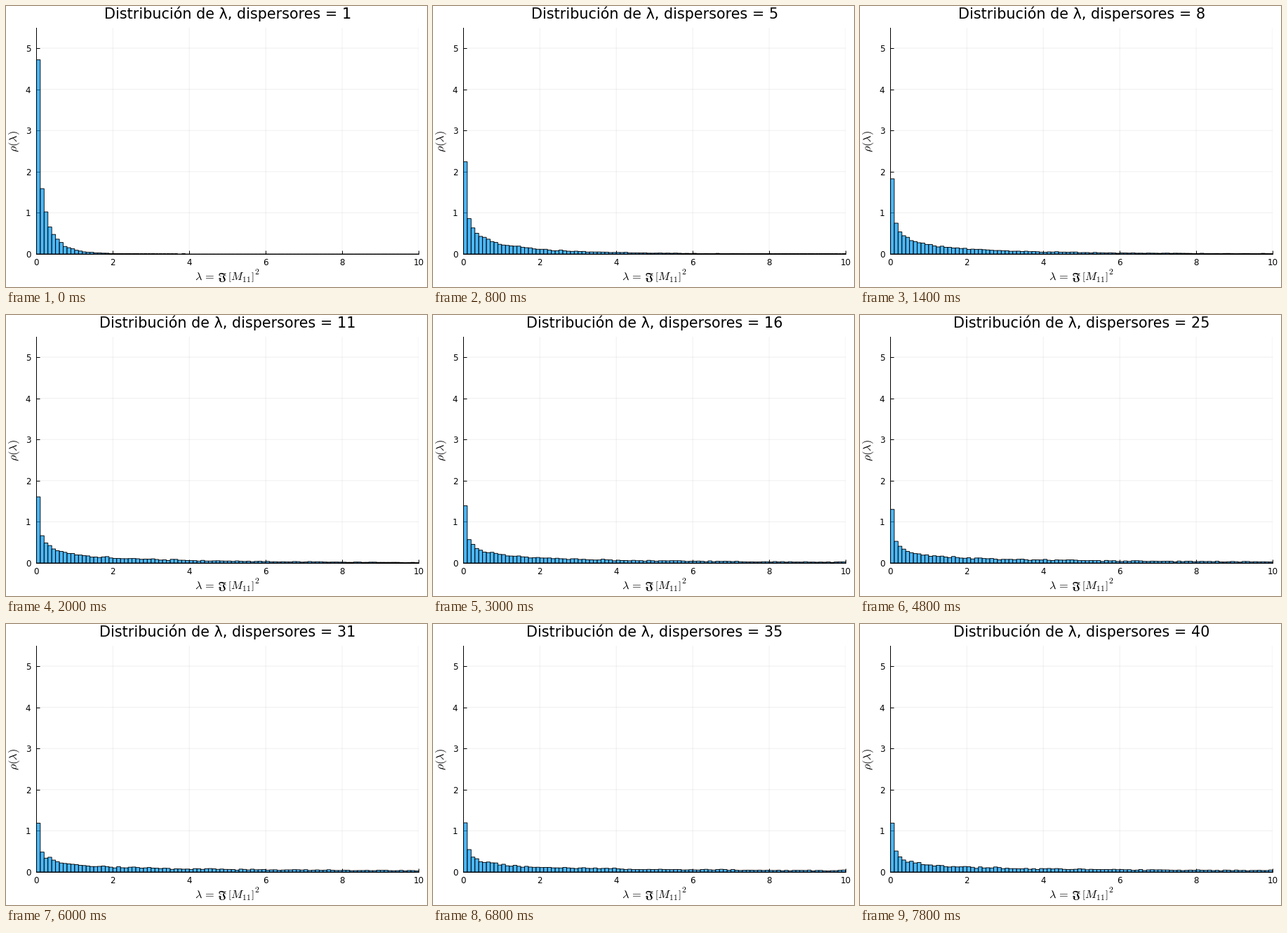
Recreate the animation shown at these times as a matplotlib script. Size 600 px wide and 400 px high, loop 8 s.

```python
import numpy as np
import matplotlib.pyplot as plt
from matplotlib.animation import FuncAnimation

W, H, DPI = 600, 400, 100
LEFT, RIGHT, TOP, BASE = 43.4, 588, 30.7, 353
FRAMES, STEP = 40, 200
SAMPLES = 16000
EDGES = np.linspace(0, 10, 101)

plt.rcParams["font.family"] = "DejaVu Sans"
plt.rcParams["mathtext.fontset"] = "cm"


def pt(px):
    return px * 72 / DPI


def density(n):
    """Histogram of a squared Gaussian whose variance is n / 4."""
    rng = np.random.default_rng(n)
    lam = rng.normal(0, np.sqrt(n) / 2, SAMPLES) ** 2
    return np.histogram(lam, EDGES, density=True)[0]


fig = plt.figure(figsize=(W / DPI, H / DPI), dpi=DPI, facecolor="white")
ax = fig.add_axes([LEFT / W, 1 - BASE / H, (RIGHT - LEFT) / W, (BASE - TOP) / H])
ax.set(xlim=(0, 10), ylim=(0, 5.5), xticks=range(0, 11, 2), yticks=range(6))
ax.set_axisbelow(True)
ax.grid(color="black", alpha=0.06, linewidth=pt(1), snap=False)
ax.tick_params(direction="in", length=pt(5), width=pt(1), labelsize=pt(11.9))
ax.tick_params(axis="x", pad=pt(6))
ax.tick_params(axis="y", pad=pt(8))
for side, spine in ax.spines.items():
    spine.set_visible(side in ("left", "bottom"))
    spine.set_linewidth(pt(1))


def label(x, y, text, size, va="baseline", **kw):
    return fig.text(x / W, 1 - y / H, text, fontsize=pt(size), ha="center", va=va, **kw)


title = label(316, 18, "", 20.75)
label(311.5, 391, r"$\lambda\,=\,\mathfrak{J}\,\left[M_{11}\right]$", 16.4)
label(357.5, 382, "$2$", 11.5)
label(12, 192, r"$\rho(\lambda)$", 16.4, va="center", rotation=90)

bars = ax.bar(EDGES[:-1], np.zeros(100), width=0.1, align="edge", snap=False,
              facecolor=(0, 0.604, 0.98, 0.7), edgecolor="black", linewidth=pt(0.9))
heights = [density(n) for n in range(1, FRAMES + 1)]


def draw(i):
    title.set_text(f"Distribución de λ, dispersores = {i + 1}")
    for bar, h in zip(bars, heights[i]):
        bar.set_height(h)
    return [title, *bars]


anim = FuncAnimation(fig, draw, frames=FRAMES, interval=STEP,
                     init_func=lambda: draw(0), repeat=True, repeat_delay=0)
plt.show()
```
